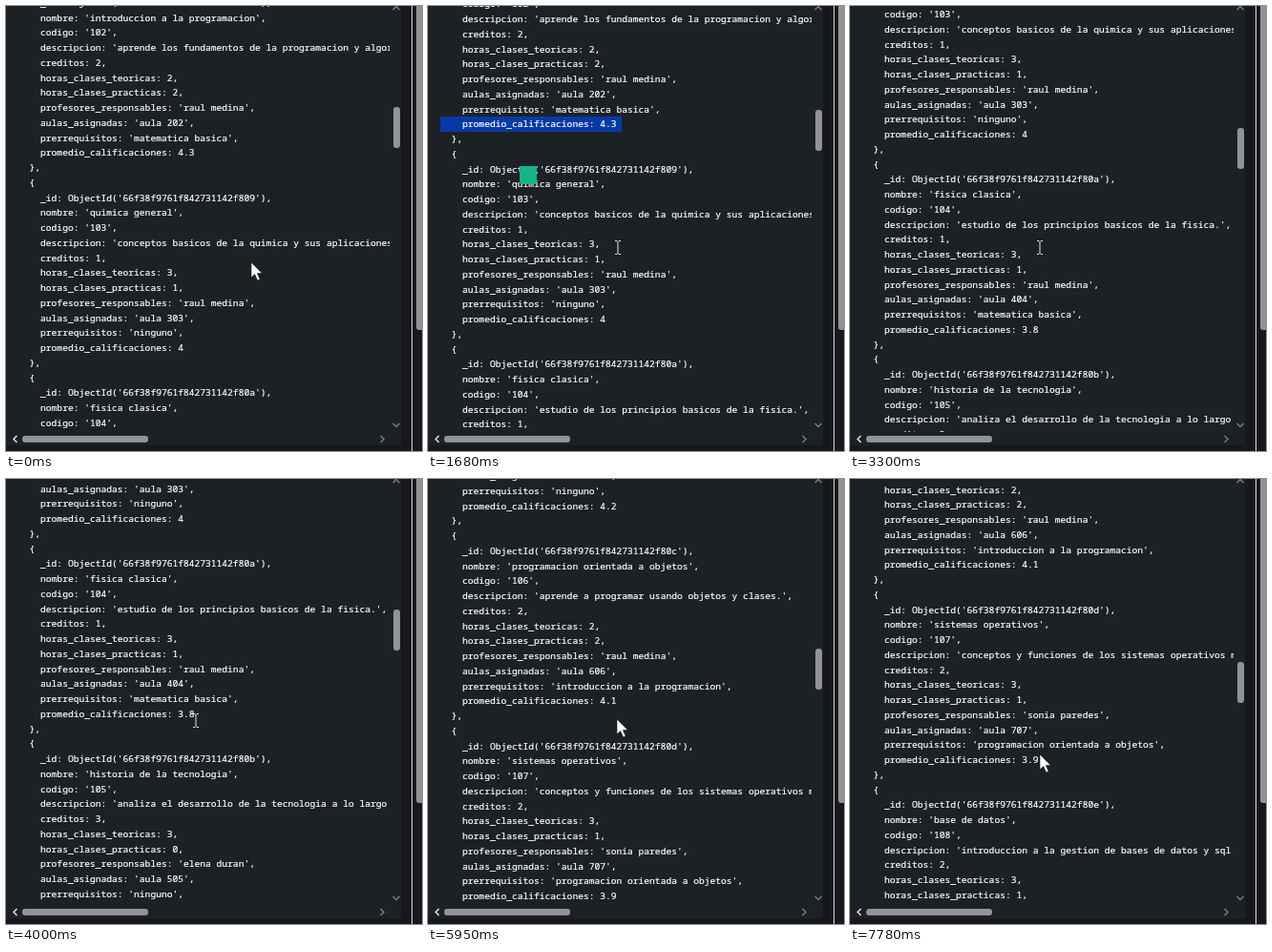
Recreate the animation shown at these times as an HTML page. Size 436x467 px, loop 8 s.

```html
<!DOCTYPE html>
<html lang="es">
<head>
<meta charset="utf-8">
<title>Cursos</title>
<style>
  html, body { margin: 0; width: 100%; height: 100%; overflow: hidden; background: #17181e; }
  #stage { position: relative; width: 436px; height: 467px; overflow: hidden; }
  #stage div, svg { position: absolute; }
  #panel { left: 0; top: 0; width: 414px; height: 461px; background: #1c2125; }
  #view { left: 0; top: 0; width: 402px; height: 447px; overflow: hidden; }
  #page { left: 13px; }
  pre {
    position: relative; margin: 0; color: #fff;
    font: 9.625px/15.75px "Noto Sans Mono", monospace;
    -webkit-text-stroke: .2px #fff;
  }
  #mark { top: 173px; height: 16px; background: #073aa5; }
  #badge { top: 168px; width: 18px; height: 19px; border-radius: 2px; background: #14b58c; }
  .thumb { background: #929395; border-radius: 3px; }
  #bar { left: 406px; width: 7px; height: 43px; }
  #bottomBar { left: 17px; top: 451px; width: 132px; height: 7px; }
  #outerBar { left: 430px; top: -10px; width: 8px; height: 350px; }
  #divider { left: 425px; top: 0; width: 1px; height: 467px; background: #dcdcdc; }
  svg { left: 0; top: 0; }
</style>
</head>
<body>
<div id="stage">
  <div id="panel"></div>
  <div id="view"><div id="page"><div id="mark"></div><pre id="text"></pre></div></div>
  <div id="badge"></div>
  <div id="bar" class="thumb"></div>
  <div id="bottomBar" class="thumb"></div>
  <div id="outerBar" class="thumb"></div>
  <div id="divider"></div>
  <svg width="436" height="467" fill="none">
    <g stroke="#777b7e" stroke-width="1.5">
      <path d="M405.5 4L409 .5L412.5 4M405.5 438L409 441.5L412.5 438M392.5 451L396 454.5L392.5 458"/>
      <path d="M11.5 451L8 454.5L11.5 458" stroke="#e4e4e4"/>
    </g>
    <g id="cursor">
      <path id="arrow" d="M-1 -1V15L2.7 11.6L5.6 18L8.2 16.9L5.4 10.6H10.4Z" fill="#fff" stroke="#111" stroke-width=".6"/>
      <path id="beam" d="M-3 -6.5H-1L0 -5.5L1 -6.5H3M0 -5.5V6.5M-3 7.5H-1L0 6.5L1 7.5H3" stroke="#e8e8e8"/>
    </g>
  </svg>
</div>
<script>
const LOOP = 8000;
const el = id => document.getElementById(id);

// nombre, descripcion, creditos, teoricas, practicas, profesor, prerrequisito, promedio
const raul = 'raul medina';
const courses = [
  ['introduccion a la programacion', 'aprende los fundamentos de la programacion y algoritmos.', 2, 2, 2, raul, 'matematica basica', 4.3],
  ['quimica general', 'conceptos basicos de la quimica y sus aplicaciones.', 1, 3, 1, raul, 'ninguno', 4],
  ['fisica clasica', 'estudio de los principios basicos de la fisica.', 1, 3, 1, raul, 'matematica basica', 3.8],
  ['historia de la tecnologia', 'analiza el desarrollo de la tecnologia a lo largo del tiempo.', 3, 3, 0, 'elena duran', 'ninguno', 4.2],
  ['programacion orientada a objetos', 'aprende a programar usando objetos y clases.', 2, 2, 2, raul, 'introduccion a la programacion', 4.1],
  ['sistemas operativos', 'conceptos y funciones de los sistemas operativos modernos.', 2, 3, 1, 'sonia paredes', 'programacion orientada a objetos', 3.9],
  ['base de datos', 'introduccion a la gestion de bases de datos y sql basico.', 2, 3, 1, raul, 'ninguno', 4]
];

el('text').textContent = courses.map(([name, about, credits, theory, practice, teacher, required, grade], i) =>
`  {
    _id: ObjectId('66f38f9761f842731142f${(0x808 + i).toString(16)}'),
    nombre: '${name}',
    codigo: '${102 + i}',
    descripcion: '${about}',
    creditos: ${credits},
    horas_clases_teoricas: ${theory},
    horas_clases_practicas: ${practice},
    profesores_responsables: '${teacher}',
    aulas_asignadas: 'aula ${(i + 2) * 101}',
    prerrequisitos: '${required}',
    promedio_calificaciones: ${grade}
  },
`).join('');

// Each move: first step time, last step time, number of steps, final value
const scrollMoves = [
  [1680, 1950, 4, 70], [2410, 2930, 7, 189], [3210, 4000, 10, 317], [4090, 4610, 7, 508],
  [4970, 5610, 8, 630], [5770, 6310, 7, 756], [6770, 7310, 7, 883]
];
const xMoves = [[180, 700, 7, 154], [1150, 1500, 5, 199], [7510, 7780, 4, 200]];
const yMoves = [[180, 700, 7, 143], [880, 970, 2, 148], [1150, 1500, 5, 253], [7510, 7780, 4, 290]];

const wheelEase = x => x >= 1 ? 1 : 1 - Math.exp(-16.4 * x ** 2.45);
const handEase = x => x * x * (3 - 2 * x);

function follow(t, value, moves, ease) {
  for (const [start, end, steps, target] of moves) {
    if (t < start) break;
    const step = Math.min(steps, 1 + Math.floor((t - start) / (end - start) * (steps - 1) + 1e-6));
    value += (target - value) * ease(step / steps);
  }
  return value;
}

const within = (t, from, to) => t >= from && t < to;
const show = (id, visible) => el(id).style.display = visible ? '' : 'none';

function draw(t) {
  const scroll = Math.round(follow(t, 0, scrollMoves, wheelEase));
  el('page').style.top = -27 - scroll + 'px';
  el('bar').style.top = Math.round(106.4 + scroll * 0.0964) + 'px';

  // A double click selects the word, a third click the whole line
  const wordOnly = t < 970;
  show('mark', t >= 880);
  el('mark').style.left = (wordOnly ? 23 : 0) + 'px';
  el('mark').style.width = (wordOnly ? 133 : 190) + 'px';

  show('badge', within(t, 1060, 2930));
  el('badge').style.left = (t < 1680 ? 93 : 96) + 'px';

  const x = Math.round(follow(t, 258, xMoves, handEase));
  const y = Math.round(follow(t, 270, yMoves, handEase));
  el('cursor').setAttribute('transform', `translate(${x} ${y})`);
  const beam = within(t, 360, 4350) || within(t, 7030, 7600);
  show('beam', beam);
  show('arrow', !beam);
}

const begin = performance.now();
function tick() {
  draw((performance.now() - begin) % LOOP);
  requestAnimationFrame(tick);
}
tick();
</script>
</body>
</html>
```
